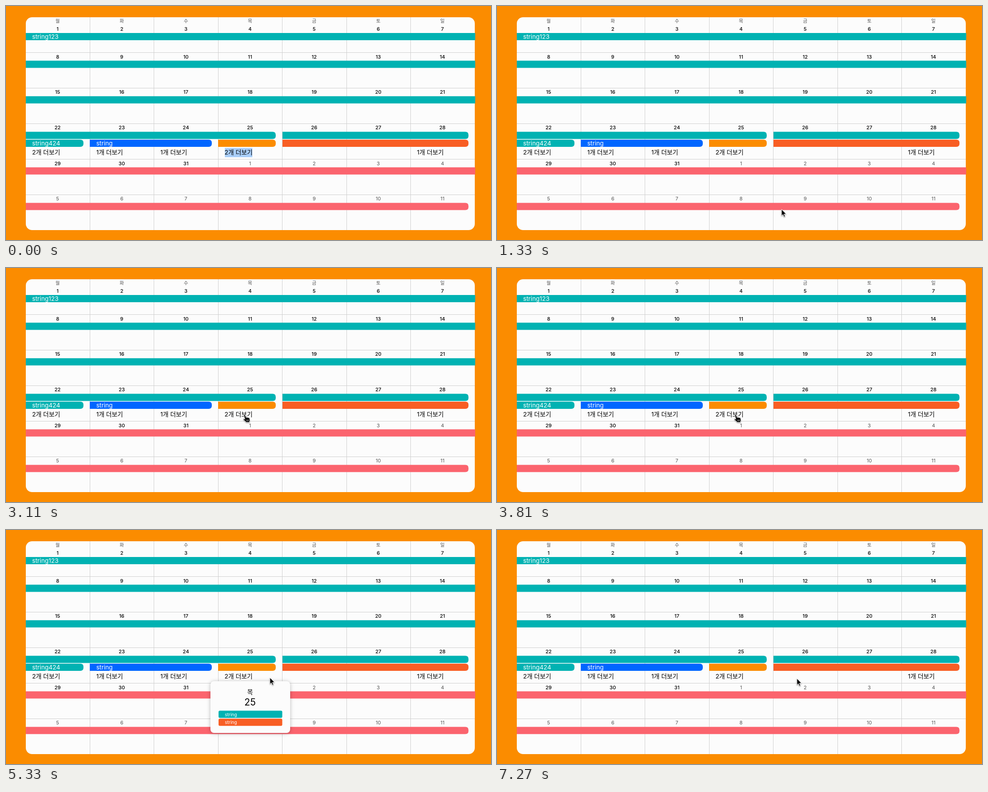
An HTML page for the animation above (8000 ms loop, 1077x520 px).

```html
<!DOCTYPE html>
<html lang="ko">
<head>
<meta charset="utf-8">
<style>
  html, body { margin: 0; width: 100%; height: 100%; overflow: hidden; background: #fb8c00; }
  svg { display: block; font-family: Inter, "Noto Sans CJK KR", "Noto Sans CJK", sans-serif; }
  .mid { text-anchor: middle; }
  #popup > rect:first-child { filter: drop-shadow(0 1px 4px #0004); }
  #arrow, #hand { filter: drop-shadow(0 1.5px 1.2px #0007); stroke: #fff; stroke-linejoin: round; }
</style>
</head>
<body>
<svg width="1077" height="520" viewBox="0 0 1077 520">
  <rect x="44" y="25" width="997" height="473" rx="14" fill="#fcfcfc"/>
  <g id="calendar"></g>
  <g id="popup"><rect x="454" y="336" width="177" height="115" rx="8" fill="#fcfcfc"/></g>
  <g id="pointer">
    <path id="arrow" stroke-width="1" d="M0 0V14.6L3.3 11.5L5.6 16.9L8 15.9L5.7 10.6H10.2Z"/>
    <g id="hand">
      <path stroke-width="1" d="M-1.8 .8C-1.4-.7 .7-.7 1.3 .9L2.9 5.6C4 4.7 5.2 5 5.6 5.9
        C6.7 5.1 7.9 5.5 8.3 6.5C9.6 5.9 10.6 6.4 10.9 7.6L11.5 10.5C11.9 12.6 10.8 13.6 10.6 16.4
        H3.2C2.6 14.4-.4 13-2.6 10.4C-3.4 9.2-1.9 8.1-.7 8.9L.6 9.7Z"/>
      <path stroke-width=".7" fill="none" d="M4 10.6L4.6 14M6.2 10.3L6.6 13.8M8.4 10.1L8.6 13.6"/>
    </g>
  </g>
</svg>
<script>
const LOOP = 8000, LEFT = 44, COL = 997 / 7;
const TEAL = '#00b2b2', BLUE = '#0066ff', ORANGE = '#fb8c00', RED = '#f85e24', PINK = '#fb646e';
const $ = id => document.getElementById(id);
const calendar = $('calendar'), popup = $('popup');

function add(parent, tag, attrs, content = '') {
  const el = document.createElementNS('http://www.w3.org/2000/svg', tag);
  for (const key in attrs) el.setAttribute(key, attrs[key]);
  el.textContent = content;
  return parent.appendChild(el);
}
const rect = (parent, x, y, width, height, fill, rx = 0) =>
  add(parent, 'rect', { x, y, width, height, fill, rx });
const text = (parent, x, y, size, content, fill = '#000', more = {}) =>
  add(parent, 'text', { x, y, 'font-size': size, fill, ...more }, content);

// Event bar, optionally with its right end rounded.
function bar(x, y, end, fill, rounded) {
  const r = rounded ? 7 : 0;
  add(calendar, 'path', { fill,
    d: `M${x} ${y}H${end - r}q${r} 0 ${r} ${r}v${16 - 2 * r}q0 ${r} ${-r} ${r}H${x}z` });
}

// Grid, weekdays and dates
for (let i = 1; i < 7; i++) rect(calendar, Math.floor(LEFT + COL * i), 25, 1, 473, '#cfcfcf');
for (let i = 0; i < 5; i++) rect(calendar, LEFT, 103 + 79 * i, 997, 1, '#cfcfcf');
const center = i => LEFT + COL * (i + 0.5) - 0.6;
[...'월화수목금토일'].forEach((day, i) =>
  text(calendar, center(i), 37, 10.5, day, '#555', { class: 'mid' }));
const dateY = [55, 116.5, 195, 274, 353.5, 432.3];
for (let i = 0; i < 42; i++) {
  const inMonth = i < 31;
  text(calendar, center(i % 7), dateY[Math.floor(i / 7)], 11, inMonth ? i + 1 : i - 30,
    inMonth ? '#000' : '#555', { class: 'mid', 'font-weight': inMonth ? 500 : 400 });
}

// Events
[60, 121.6, 200.5].forEach(y => bar(LEFT, y, 1042, TEAL));
bar(LEFT, 279.5, 599, TEAL, true);
bar(614, 279.5, 1027, TEAL, true);
bar(LEFT, 297, 172, TEAL, true);
bar(186, 297, 457, BLUE, true);
bar(471, 297, 599, ORANGE, true);
bar(614, 297, 1027, RED, true);
bar(LEFT, 358.5, 1042, PINK);
bar(LEFT, 437.4, 1027, PINK, true);
text(calendar, 58, 73.3, 13.6, 'string123', '#fff');
text(calendar, 58, 310.3, 13.6, 'string424', '#fff');
text(calendar, 200.4, 310.3, 13.6, 'string', '#fff');

const highlight = rect(calendar, 486, 315.5, 61, 20.5, '#a8cdf8');
[[0, 2], [1, 1], [2, 1], [3, 2], [6, 1]].forEach(([col, count]) =>
  text(calendar, 58 + COL * col, 330, 13.6, `${count}개 더보기`));

// Popup
text(popup, 542, 365, 14, '목', '#000', { class: 'mid' });
text(popup, 542, 389.8, 21, '25', '#000', { class: 'mid' });
[[401.6, TEAL], [419.2, RED]].forEach(([y, fill]) => {
  rect(popup, 472, y, 141.5, 16, fill, 3);
  text(popup, 486, y + 12, 10, 'string', '#fff');
});

// Pointer hotspot: time, x, y
const path = [
  [500, 695, 532], [870, 668, 495], [1330, 632, 452], [1690, 588, 371], [2050, 553, 341],
  [2270, 546, 335], [2750, 530, 326.5], [5030, 530, 326.5], [5250, 566, 327],
  [5500, 628, 330], [5870, 657, 331], [6130, 666, 330], [LOOP, 666, 330]
];
function pointerAt(t) {
  const i = Math.max(1, path.findIndex(p => p[0] > t));
  const [t0, x0, y0] = path[i - 1], [t1, x1, y1] = path[i];
  const k = Math.max(0, (t - t0) / (t1 - t0));
  return [x0 + (x1 - x0) * k, y0 + (y1 - y0) * k];
}

const show = (el, visible) => el.setAttribute('visibility', visible ? 'visible' : 'hidden');

function draw() {
  const t = performance.now() % LOOP;
  const [x, y] = pointerAt(t);
  const overLink = x < 548 && y < 336;
  $('pointer').setAttribute('transform', `translate(${x} ${y})`);
  show($('arrow'), t >= 500 && !overLink);
  show($('hand'), overLink);
  show(highlight, t < 620);
  show(popup, t >= 4100 && t < 6650);
  requestAnimationFrame(draw);
}
draw();
</script>
</body>
</html>
```
